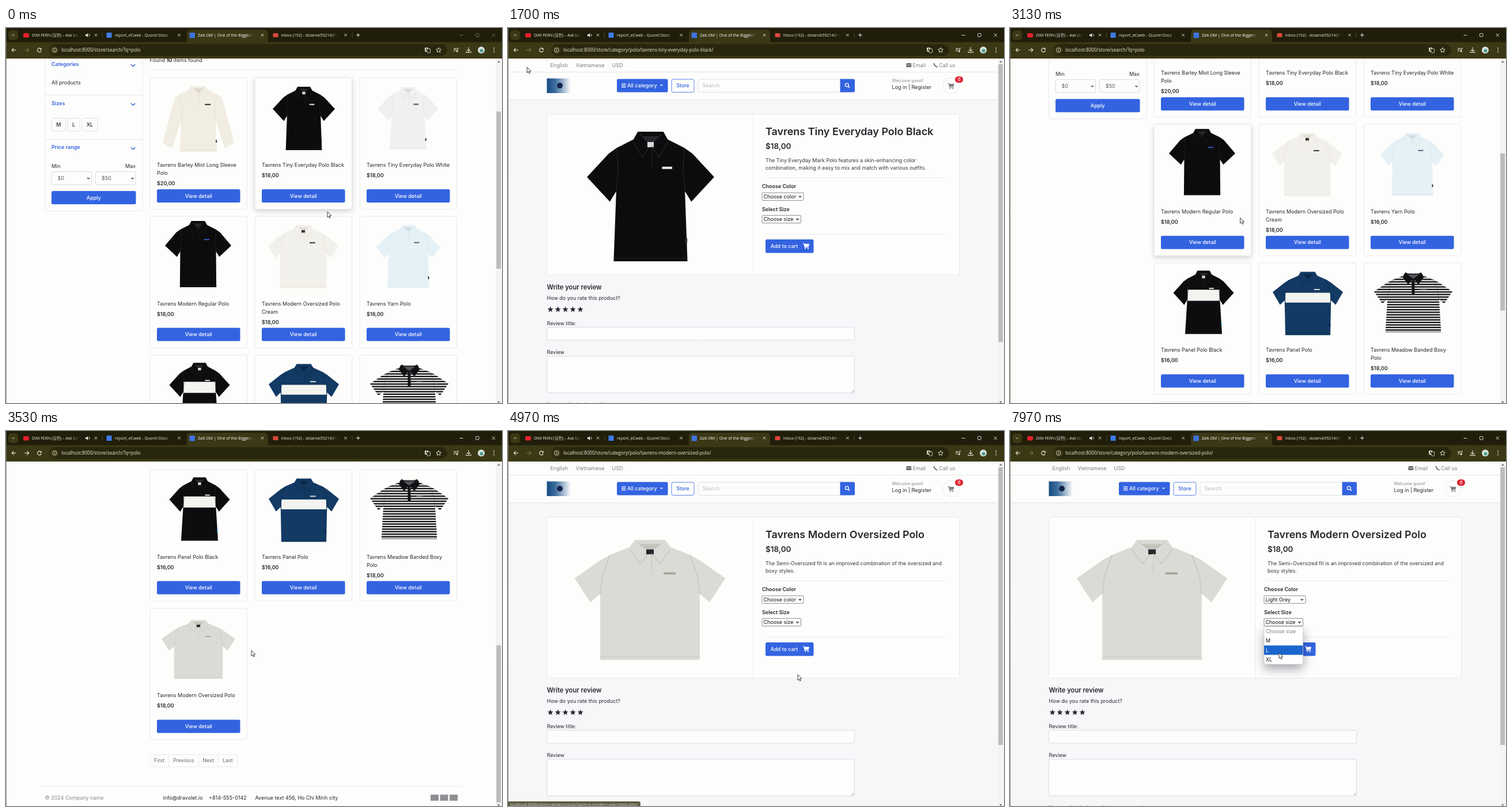
Animation, 861 px wide and 651 px high, one loop 8000 ms. Source, as an HTML page with a canvas:

```html
<!DOCTYPE html>
<html lang="en">
<head>
<meta charset="utf-8">
<title>Polo store</title>
<style>
html, body { margin: 0; width: 100%; height: 100%; overflow: hidden; background: #fdfdfc; }
canvas { display: block; width: 861px; height: 651px; }
</style>
</head>
<body>
<canvas id="stage"></canvas>
<script>
const W = 861, H = 651, LOOP = 8000;
const canvas = document.getElementById('stage');
const ctx = canvas.getContext('2d');
const dpr = window.devicePixelRatio || 1;
canvas.width = W * dpr;
canvas.height = H * dpr;

const INTER = 'Inter, sans-serif';
const UI = '"Open Sans", "Noto Sans CJK KR", "Noto Sans CJK", sans-serif';
const WHITE = '#fdfdfc', BLUE = '#3363e0', INK = '#25272c', LINE = '#e4e4e8', MUTED = '#85878c';
const STRIP = '#201e0a', BAR = '#3b3815', PILL = '#29260e', LIGHT = '#eceadf';
const BASE = 8.97;

// ---------- drawing helpers ----------
function text(s, x, y, { size = BASE, color = INK, weight = 400, align = 'left', family = INTER } = {}) {
  ctx.font = `${weight} ${size}px ${family}`;
  ctx.textAlign = align;
  ctx.fillStyle = color;
  ctx.fillText(s, x, y);
}
function box(x, y, w, h, r, fill, stroke, lw = 0.8) {
  ctx.beginPath();
  ctx.roundRect(x, y, w, h, r);
  if (fill) { ctx.fillStyle = fill; ctx.fill(); }
  if (stroke) { ctx.strokeStyle = stroke; ctx.lineWidth = lw; ctx.stroke(); }
}
function rect(x, y, w, h, fill) { ctx.fillStyle = fill; ctx.fillRect(x, y, w, h); }
function dot(x, y, r, fill, stroke, lw = 0.8) {
  ctx.beginPath();
  ctx.arc(x, y, r, 0, 7);
  if (fill) { ctx.fillStyle = fill; ctx.fill(); }
  if (stroke) { ctx.strokeStyle = stroke; ctx.lineWidth = lw; ctx.stroke(); }
}
function trace(pts, close) {
  ctx.beginPath();
  pts.forEach(([x, y], i) => i ? ctx.lineTo(x, y) : ctx.moveTo(x, y));
  if (close) ctx.closePath();
}
function line(pts, color, lw = 1) {
  trace(pts);
  ctx.strokeStyle = color;
  ctx.lineWidth = lw;
  ctx.stroke();
}
function poly(pts, fill) { trace(pts, true); ctx.fillStyle = fill; ctx.fill(); }
function chevron(x, y, r, color, lw) { line([[x - r, y - r / 2], [x, y + r / 2], [x + r, y - r / 2]], color, lw); }
function cross(x, y, r, color, lw = 0.9) {
  line([[x - r, y - r], [x + r, y + r]], color, lw);
  line([[x - r, y + r], [x + r, y - r]], color, lw);
}
function withShadow(blur, dy, alpha, draw) {
  ctx.save();
  ctx.shadowColor = `rgba(20,20,40,${alpha})`;
  ctx.shadowBlur = blur * dpr;
  ctx.shadowOffsetY = dy * dpr;
  draw();
  ctx.restore();
}
function star(x, y, r, fill, stroke) {
  const pts = Array.from({ length: 10 }, (_, i) => {
    const a = i * Math.PI / 5 - Math.PI / 2, q = i % 2 ? r * 0.45 : r;
    return [x + q * Math.cos(a), y + q * Math.sin(a)];
  });
  if (fill) poly(pts, fill);
  else line([...pts, pts[0]], stroke, 0.9);
}
function cart(x, y, color) {
  line([[x - 5.5, y - 4.5], [x - 3.7, y - 4.5], [x - 2.2, y + 2.2], [x + 4.2, y + 2.2]], color, 1.2);
  poly([[x - 3.5, y - 3.7], [x + 5.5, y - 3.7], [x + 4.4, y + 0.9], [x - 2.6, y + 0.9]], color);
  dot(x - 1.4, y + 4.2, 1.1, color);
  dot(x + 3.4, y + 4.2, 1.1, color);
}

// ---------- products ----------
const boxy = { tip: 0.32, cuff: [0.79, 0.52], pit: [0.66, 0.45], hem: 0.66 };
const items = [
  { name: ['Tavrens Barley Mist Long Sleeve', 'Polo'], price: '$20,00', at: [84, 15], w: 62, h: 114, fill: '#f1ede2', seam: '#dfd9ca',
    tip: 0.86, cuff: [0.74, 0.95], pit: [0.48, 0.52], hem: 0.52, mark: '#333', tag: '#222' },
  { name: ['Tavrens Tiny Everyday Polo Black'], price: '$18,00', at: [85, 16], w: 54, h: 110, fill: '#0c0c0e', seam: '#26262a', mark: '#e8e8e8', tag: '#2a2a2e', label: '#ddd' },
  { name: ['Tavrens Tiny Everyday Polo White'], price: '$18,00', at: [84, 16], w: 53, h: 109, fill: '#f0f0f1', seam: '#dcdce0', hem: 0.6, mark: '#444', tag: '#222' },
  { name: ['Tavrens Modern Regular Polo'], price: '$18,00', at: [83.5, 8.5], w: 57.5, h: 115, fill: '#0c0c0d', seam: '#252528', tip: 0.37, hem: 0.55, mark: '#2f58b8' },
  { name: ['Tavrens Modern Oversized Polo', 'Cream'], price: '$18,00', at: [84, 15.5], w: 61, h: 110, fill: '#f2f0ea', seam: '#e0ddd3', ...boxy, mark: '#333', label: '#333' },
  { name: ['Tavrens Yarn Polo'], price: '$16,00', at: [84.5, 15.5], w: 55.5, h: 109, fill: '#e6f1f6', seam: '#cfdfe8', cuff: [0.74, 0.52], pit: [0.62, 0.46], hem: 0.65, mark: '#50607a', tag: '#222' },
  { name: ['Tavrens Panel Polo Black'], price: '$16,00', at: [86, 14], w: 52.5, h: 110, fill: '#0d0d0f', seam: '#27272b', hem: 0.61, mark: '#ddd', tag: '#2fa7d8', label: '#ddd', band: [0.3, 0.475, 0.53] },
  { name: ['Tavrens Panel Polo'], price: '$16,00', at: [85, 16], w: 61, h: 110, fill: '#123a63', seam: '#0b2848', ...boxy, hem: 0.64, mark: '#d8d8d0', tag: '#0a1c30', band: [0.33, 0.485, 0.64] },
  { name: ['Tavrens Meadow Banded Boxy', 'Polo'], price: '$18,00', at: [86, 17], w: 68, h: 104, fill: '#f1f0ec', seam: '#55555a', ...boxy, hem: 0.71, mark: '#777', collar: '#111114', stripes: true },
  { name: ['Tavrens Modern Oversized Polo'], price: '$18,00', at: [84, 21], w: 64, h: 102, fill: '#dbdbd5', seam: '#c3c3bc', ...boxy, mark: '#a5a59e', label: '#25252a' }
];

function shirt(p, cx, top, k = 1) {
  const { tip = 0.35, cuff = [0.64, 0.54], pit = [0.54, 0.46], hem = 0.58 } = p;
  const P = (x, y) => [x * p.w, y * p.h];
  const half = [[0.2, 0], [0.27, 0.06], [0.53, 0.125], [0.66, 0.17], [1, tip], cuff, pit, [hem, 1]];
  const outline = [...half, ...half.map(([x, y]) => [-x, y]).reverse()].map(q => P(...q));
  const collar = p.collar || p.fill;
  ctx.save();
  ctx.translate(cx, top);
  ctx.scale(k, k);
  ctx.lineJoin = 'round';
  poly(outline, p.fill);
  ctx.save();
  trace(outline, true);
  ctx.clip();
  if (p.stripes) for (let y = 2; y < p.h; y += 4.4) rect(-p.w, y, 2 * p.w, 2.3, '#141418');
  if (p.band) {
    const [a, b, x] = p.band;
    rect(-x * p.w, a * p.h, 2 * x * p.w, (b - a) * p.h, '#f3f3f0');
  }
  ctx.restore();
  for (const s of [-1, 1]) {
    line([P(s * 0.53, 0.125), P(s * (pit[0] - 0.03), 0.3), P(s * pit[0], pit[1])], p.seam, 0.6);
    poly([P(s * 0.2, 0), P(s * 0.27, 0.08), P(s * 0.13, 0.2), P(0, 0.1), P(s * 0.1, 0.03)], collar);
    line([P(s * 0.27, 0.08), P(s * 0.13, 0.2), P(0, 0.1), P(s * 0.17, 0.02)], p.seam, 0.6);
  }
  poly([P(-0.14, 0.035), P(0.14, 0.035), P(0, 0.11)], p.seam);
  if (p.label) rect(-0.05 * p.w, 0.08 * p.h, 0.1 * p.w, 0.04 * p.h, p.label);
  if (p.collar) rect(-2.5, 0.1 * p.h, 5, 0.26 * p.h, p.collar);
  line([P(0.02, 0.11), P(0.02, 0.28)], p.seam, 0.5);
  line([P(-hem, 0.975), P(hem, 0.975)], p.seam, 0.4);
  rect(0.18 * p.w, 0.27 * p.h, 0.16 * p.w, 0.018 * p.h, p.mark);
  if (p.tag) rect(hem * p.w - 2, 0.82 * p.h, 1.8, 4.5, p.tag);
  ctx.restore();
}

// ---------- motion ----------
const path = [
  [0, 558, 319], [350, 530, 292], [700, 528, 291], [1000, 490, 266], [1700, 33, 68], [1950, 14, 38],
  [2250, 14, 38], [2830, 373, 283], [3150, 400, 330], [3530, 426, 381], [4050, 348, 511], [4600, 348, 511],
  [4970, 503, 423], [5600, 492, 293], [5850, 492, 294], [6130, 489, 314], [6450, 487, 325], [6700, 487, 325],
  [7050, 482, 332], [7300, 482, 332], [7700, 470, 366], [7970, 467, 385], [8000, 467, 385]
];
const clamp01 = v => Math.max(0, Math.min(1, v));
const ease = v => v * v * (3 - 2 * v);
function cursorAt(t) {
  const i = Math.max(1, path.findIndex(p => p[0] > t));
  const [a, b] = [path[i - 1], path[i]];
  const k = ease(clamp01((t - a[0]) / (b[0] - a[0])));
  return [a[1] + (b[1] - a[1]) * k, a[2] + (b[2] - a[2]) * k];
}
const scrollAt = t => t < 2950 ? 0 : 500.6 * ease(clamp01((t - 2950) / 480));

// ---------- browser frame ----------
function tabTitle(s, x, w, color) {
  const fade = ctx.createLinearGradient(x + w - 16, 0, x + w, 0);
  fade.addColorStop(0, color);
  fade.addColorStop(1, 'rgba(60,56,21,0)');
  ctx.save();
  ctx.beginPath();
  ctx.rect(x, 0, w, 25);
  ctx.clip();
  text(s, x, 15.3, { size: 7, color: fade, family: UI });
  ctx.restore();
}
function arrow(x, y, dir, color) {
  line([[x - 3.7, y], [x + 3.7, y]], color, 1.1);
  line([[x + dir * 0.5, y - 3.4], [x + dir * 3.8, y], [x + dir * 0.5, y + 3.4]], color, 1.1);
}
function browser(url, forward, backHot, focused) {
  rect(0, 0, W, 25, STRIP);
  rect(0, 24.5, W, 28.5, BAR);
  box(4, 4, 17, 17, 5, BAR);
  chevron(12.5, 12.5, 2.3, LIGHT, 1);
  box(314, 3, 141, 26, 6, BAR);
  box(30, 9, 10, 7.5, 2, '#e5202c');
  tabTitle('DIM FERN (딤펀) – Ask Us Tonight', 45, 87, LIGHT);
  poly([[138, 11], [140, 11], [142.3, 9], [142.3, 16], [140, 14], [138, 14]], LIGHT);
  ctx.beginPath();
  ctx.arc(142.5, 12.5, 2.6, -0.9, 0.9);
  ctx.stroke();
  box(174.5, 8, 9, 9, 1, '#3f7be6');
  tabTitle('report_eCweb - Quorel Docs', 189, 104, LIGHT);
  box(318.5, 8, 9.5, 9.5, 1, '#3e72dc');
  tabTitle('Zalt-OM | One of the Biggest Clothing', 333, 102, '#ffffff');
  box(463.5, 9, 9, 7, 1, '#d9473b');
  tabTitle('Inbox (192) - dolanvk59214@mail', 477.5, 102, LIGHT);
  for (const x of [156, 300.5, 445, 589.5]) cross(x, 12.3, 2.2, LIGHT);
  for (const x of [167.5, 601]) line([[x, 8], [x, 17]], '#5c5932', 0.8);
  line([[608, 12.3], [614.6, 12.3]], LIGHT);
  line([[611.3, 9], [611.3, 15.6]], LIGHT);
  const win = focused ? LIGHT : '#77745a';
  line([[787.5, 12.5], [793.5, 12.5]], win, 0.9);
  box(815.5, 9.5, 5.5, 5.5, 1, null, win, 0.9);
  cross(846.3, 12.3, 2.8, win);

  if (backHot) dot(14, 38.3, 9.5, '#5c5936');
  arrow(14, 38.3, -1, LIGHT);
  arrow(36, 38.3, 1, forward ? LIGHT : '#77744c');
  ctx.beginPath();
  ctx.arc(58, 38.3, 3.3, 0.3, 5.4);
  ctx.strokeStyle = LIGHT;
  ctx.lineWidth = 1.1;
  ctx.stroke();
  poly([[61.7, 34.4], [61.7, 37.8], [58.3, 37.8]], LIGHT);
  box(75.5, 28, 690, 20.5, 10, PILL);
  dot(84.3, 38.3, 7, '#3b3815');
  dot(84.3, 38.3, 3.7, null, LIGHT, 0.8);
  line([[84.3, 37.8], [84.3, 40.4]], LIGHT, 0.9);
  dot(84.3, 36.4, 0.5, LIGHT);
  text(url, 96, 41.1, { size: 8.1, color: LIGHT, family: UI });
  box(727, 34, 6, 7, 1, LIGHT);
  box(731, 36, 5.5, 7, 1, PILL, LIGHT);
  text('A', 730, 39.8, { size: 5.5, color: PILL, weight: 700, align: 'center' });
  star(751, 38.5, 4.6, null, LIGHT);
  for (const y of [35.5, 37.7, 39.9]) line([[777, y], [y > 39 ? 780 : 782.5, y]], LIGHT, 0.9);
  line([[784, 40.5], [784, 35], [786, 35]], LIGHT, 1);
  dot(782.9, 40.5, 1.4, LIGHT);
  line([[803, 33.5], [803, 40]], LIGHT, 1.1);
  chevron(803, 39, 2.8, LIGHT, 1.1);
  line([[799, 40.5], [799, 42.5], [807, 42.5], [807, 40.5]], LIGHT, 1.1);
  dot(825, 38.3, 6, '#d8e3dc');
  dot(825.5, 39.5, 3, '#4d9b8c');
  for (const y of [35, 38.3, 41.6]) dot(847, y, 0.9, LIGHT);
}
function scrollbar(y, h) {
  rect(850, 53, 11, 598, '#f4f4f3');
  rect(851.3, y, 7.8, h, '#bcbcba');
  poly([[852.8, 60], [857.8, 60], [855.3, 56.8]], '#707070');
  poly([[852.8, 648], [857.8, 648], [855.3, 651]], '#707070');
}

// ---------- list page ----------
function button(s, x, y, w, h, cx = x + w / 2) {
  box(x, y, w, h, 2.5, BLUE);
  text(s, cx, y + h / 2 + 3.2, { color: '#fff', weight: 500, align: 'center' });
}
function card(p, i, cur, scroll) {
  const x = 250 + (i % 3) * 182, y = 86.5 + Math.floor(i / 3) * 240.6;
  const [mx, my] = [cur[0], cur[1] + scroll];
  const hot = mx > x - 5 && mx < x + 174 && my > y - 5 && my < y + 234;
  if (hot) withShadow(10, 3, 0.2, () => box(x, y, 168.5, 228, 3, WHITE));
  box(x, y, 168.5, 228, 3, WHITE, LINE);
  shirt(p, x + p.at[0], y + p.at[1] - 0.5);
  p.name.forEach((s, n) => text(s, x + 12, y + 154.5 + n * 14));
  text(p.price, x + 12, y + 172.5 + (p.name.length - 1) * 14, { weight: 600 });
  button('View detail', x + 12, y + 193.5, 144.5, 23);
}
function sidebar() {
  box(67.5, -100, 169.5, 418, 3, WHITE, LINE);
  for (const y of [116.5, 193.5]) line([[67.5, y], [237, y]], LINE, 0.8);
  [['Categories', 66], ['Sizes', 133.5], ['Price range', 210]].forEach(([s, y]) => {
    text(s, 79, y, { color: BLUE, weight: 600 });
    chevron(220.7, y - 1, 3.6, BLUE, 1.5);
  });
  text('All products', 79, 98.3);
  [['M', 79, 24.5], ['L', 107, 21], ['XL', 132, 27]].forEach(([s, x, w]) => {
    box(x, 156.5, w, 22.5, 2.5, WHITE, '#d8d8dd');
    text(s, x + w / 2, 171, { weight: 500, align: 'center' });
  });
  text('Min', 79, 242.5);
  text('Max', 225, 242.5, { align: 'right' });
  [['$0', 79], ['$50', 155.5]].forEach(([s, x]) => {
    box(x, 249.5, 69.5, 22.5, 2.5, WHITE, '#cfd1d8');
    text(s, x + 10.5, 263.8, { color: '#555a62' });
    chevron(x + 64, 261, 2, '#333', 1.2);
  });
  button('Apply', 79, 283, 146.5, 23);
}
function listPage(cur, scroll) {
  rect(0, 53, W, 598, WHITE);
  ctx.save();
  ctx.translate(0, -scroll);
  sidebar();
  text('Found ', 249.5, 59);
  let x = 249.5 + ctx.measureText('Found ').width;
  text('10', x, 59, { weight: 700 });
  x += ctx.measureText('10').width;
  text(' items found', x, 59);
  line([[249.5, 72.5], [783, 72.5]], LINE, 0.8);
  items.forEach((p, i) => card(p, i, cur, scroll));
  ctx.translate(0, 500.6);
  box(250, 562, 151.5, 21, 2.5, WHITE, LINE);
  for (const v of [282.8, 334.3, 368.2]) line([[v, 562], [v, 583]], LINE, 0.8);
  [['First', 266], ['Previous', 308.3], ['Next', 351.2], ['Last', 384.8]]
    .forEach(([s, v]) => text(s, v, 575.3, { color: '#66686d', align: 'center' }));
  line([[60, 617], [790, 617]], LINE, 0.8);
  text('© 2024 Company name', 67.5, 639.5, { color: MUTED });
  text('info@dravolet.io', 272.5, 639.5);
  text('+814-555-0142', 352, 639.5);
  text('Avenue text 456, Ho Chi Minh city', 432.5, 639.5);
  for (const v of [737, 753.5, 770]) rect(v, 631.3, 14, 10.5, '#8e8f93');
  ctx.restore();
  scrollbar(145 + scroll * 0.4535, 273);
}

// ---------- product page ----------
function header() {
  rect(0, 53, W, 71.5, WHITE);
  for (const y of [76.5, 124.5]) line([[0, y], [850, y]], '#dfdfe4', 0.8);
  const grey = { color: '#7b7d83' };
  [['English', 73.5], ['Vietnamese', 117.5], ['USD', 180.5], ['Email', 702.5], ['Call us', 748]]
    .forEach(([s, x]) => text(s, x, 67.5, grey));
  box(691.3, 61, 9, 7, 1, '#66686d');
  line([[691.5, 62.3], [695.8, 65.5], [700, 62.3]], WHITE, 0.8);
  ctx.lineCap = 'round';
  line([[739.5, 61.5], [740.5, 64.5], [742.5, 66.5], [745, 67.5]], '#66686d', 1.8);
  ctx.lineCap = 'butt';
  const g = ctx.createLinearGradient(67, 0, 109, 0);
  g.addColorStop(0, '#134a80');
  g.addColorStop(0.35, '#3c6c9c');
  g.addColorStop(1, WHITE);
  rect(67.5, 87.5, 42, 25.5, g);
  dot(90, 100, 5, '#14234f');
  box(189, 88.5, 88.5, 23, 2.5, BLUE);
  for (const y of [97, 99.8, 102.6]) line([[197, y], [204.5, y]], '#fff', 1.3);
  text('All category', 207, 103, { color: '#fff', weight: 500 });
  poly([[264, 98.4], [269, 98.4], [266.5, 101]], '#fff');
  box(284, 89, 39, 22.5, 2.5, WHITE, BLUE);
  text('Store', 303.5, 103, { color: BLUE, weight: 500, align: 'center' });
  box(330, 89, 260, 22.5, 2.5, WHITE, '#d5d7dc');
  text('Search', 337.5, 103.3, { color: '#b9bbc1' });
  box(576.5, 88.5, 25.5, 23, [0, 2.5, 2.5, 0], BLUE);
  dot(588.3, 99, 2.9, null, '#fff', 1.4);
  line([[590.4, 101.2], [593, 103.8]], '#fff', 1.6);
  text('Welcome guest!', 666.5, 94, { size: 7.17, color: MUTED });
  text('Log in | Register', 666.5, 106.3);
  dot(769.3, 100, 14, WHITE, LINE);
  cart(769, 100.8, '#7d7f84');
  box(776, 84, 14, 11, 5.5, '#e02434');
  text('0', 783, 92.3, { size: 7.2, color: '#fff', weight: 600, align: 'center' });
}
function nativeSelect(s, y, w) {
  box(441, y, w, 13.3, 1.5, '#fff', '#6f6f6f');
  text(s, 443.5, y + 9.8, { color: '#111' });
  chevron(441 + w - 6, y + 6.7, 2.1, '#111', 1.2);
}
function popup(options, y, w, cur) {
  const step = 16.3, h = options.length * step;
  const over = Math.floor((cur[1] - y) / step);
  const shape = [0, 0, 4, 4];
  withShadow(18, 8, 0.38, () => box(441, y, w, h, shape, '#fff'));
  ctx.save();
  box(441, y, w, h, shape, '#fff', '#c9c9cc', 0.7);
  ctx.clip();
  options.forEach((s, i) => {
    const hot = i === over, top = y + i * step;
    if (hot) rect(441, top, w, step, i ? '#1b66cc' : '#bcbcbe');
    text(s, 444, top + 11.3, { color: hot ? '#fff' : i ? '#111' : '#7d7d80' });
  });
  ctx.restore();
}
function productPage(p, pos, about, t, cur) {
  rect(0, 53, W, 598, '#f7f7f9');
  header();
  box(67.5, 149.5, 716, 279.5, 3, WHITE, LINE);
  line([[426, 149.5], [426, 429]], LINE, 0.8);
  shirt(p, ...pos, 2.045);
  text(p.name.join(' '), 447, 186, { size: 17.93, weight: 600 });
  text(p.price, 447, 209.7, { size: 13.45, weight: 600 });
  about.forEach((s, i) => text(s, 447, 232.6 + i * 13.4, { color: '#35373c' }));
  for (const y of [259.8, 358]) line([[447, y], [762.5, y]], LINE, 0.8);
  text('Choose Color', 441, 278, { weight: 600 });
  text('Select Size', 441, 317.6, { weight: 600 });
  nativeSelect(t > 6600 ? 'Light Grey' : 'Choose color', 286, 72);
  nativeSelect('Choose size', 325.3, 67.5);
  button('Add to cart', 447, 367, 83.5, 23.5, 479.5);
  cart(517.5, 378.5, '#fff');

  text('Write your review', 67.5, 453.6, { size: 11.2, weight: 600 });
  text('How do you rate this product?', 67.5, 471.8);
  for (let i = 0; i < 5; i++) star(73.6 + i * 13, 488.6, 5.3, '#262b3a');
  text('Review title:', 67.5, 515.5);
  box(67.5, 519.5, 534, 22.5, 2.5, WHITE, '#cfd3dc');
  text('Review', 67.5, 566);
  box(67.5, 570, 534, 63.5, 2.5, WHITE, '#cfd3dc');
  for (const d of [5, 2.5]) line([[601 - d, 632.5], [600.5, 633 - d]], '#888', 0.7);
  text('You need to be logged in to post a review', 67.5, 656.5);
  if (t > 5800 && t < 6600) popup(['Choose color', 'Light Grey'], 300, 71.5, cur);
  if (t > 7250) popup(['Choose size', 'M', 'L', 'XL'], 339.7, 67.5, cur);
  scrollbar(63, 482);
}

function statusBar(s) {
  ctx.font = `400 7px ${UI}`;
  box(0, 643, ctx.measureText(s).width + 8, 16, [0, 3, 0, 0], '#5d5b45');
  text(s, 3.5, 651.3, { size: 7, color: '#dddbcf', family: UI });
}
function pointer([x, y]) {
  ctx.save();
  ctx.translate(x, y);
  trace([[0, 0], [0, 9.6], [2.2, 7.6], [3.7, 11], [5.3, 10.3], [3.8, 7], [6.8, 6.9]], true);
  ctx.fillStyle = '#fff';
  ctx.fill();
  ctx.strokeStyle = '#111';
  ctx.lineWidth = 0.8;
  ctx.stroke();
  ctx.restore();
}

const HOST = 'localhost:8000/store/';
const BLACK_URL = HOST + 'category/polo/tavrens-tiny-everyday-polo-black/';
const GREY_URL = HOST + 'category/polo/tavrens-modern-oversized-polo/';
const blackAbout = ['The Tiny Everyday Mark Polo features a skin-enhancing color', 'combination, making it easy to mix and match with various outfits.'];
const greyAbout = ['The Semi-Oversized fit is an improved combination of the oversized and', 'boxy styles.'];

function draw(t) {
  const cur = cursorAt(t);
  const onBlack = t >= 850 && t < 2250, onGrey = t >= 4700;
  ctx.setTransform(dpr, 0, 0, dpr, 0, 0);
  if (onBlack) productPage(items[1], [247.5, 180], blackAbout, t, cur);
  else if (onGrey) productPage(items[9], [246.5, 189], greyAbout, t, cur);
  else listPage(cur, scrollAt(t));
  const url = onBlack ? BLACK_URL : onGrey ? GREY_URL : HOST + 'search/?q=polo';
  browser(url, t >= 2250 && !onGrey, t > 1870 && t < 2900, t > 250);
  line([[0.4, 0], [0.4, H]], '#77755c', 0.8);
  if (t > 500 && t < 1000) statusBar(BLACK_URL);
  if (t > 4150 && t < 5020) statusBar(GREY_URL);
  pointer(cur);
}
function tick() {
  draw(performance.now() % LOOP);
  requestAnimationFrame(tick);
}
tick();
</script>
</body>
</html>
```
